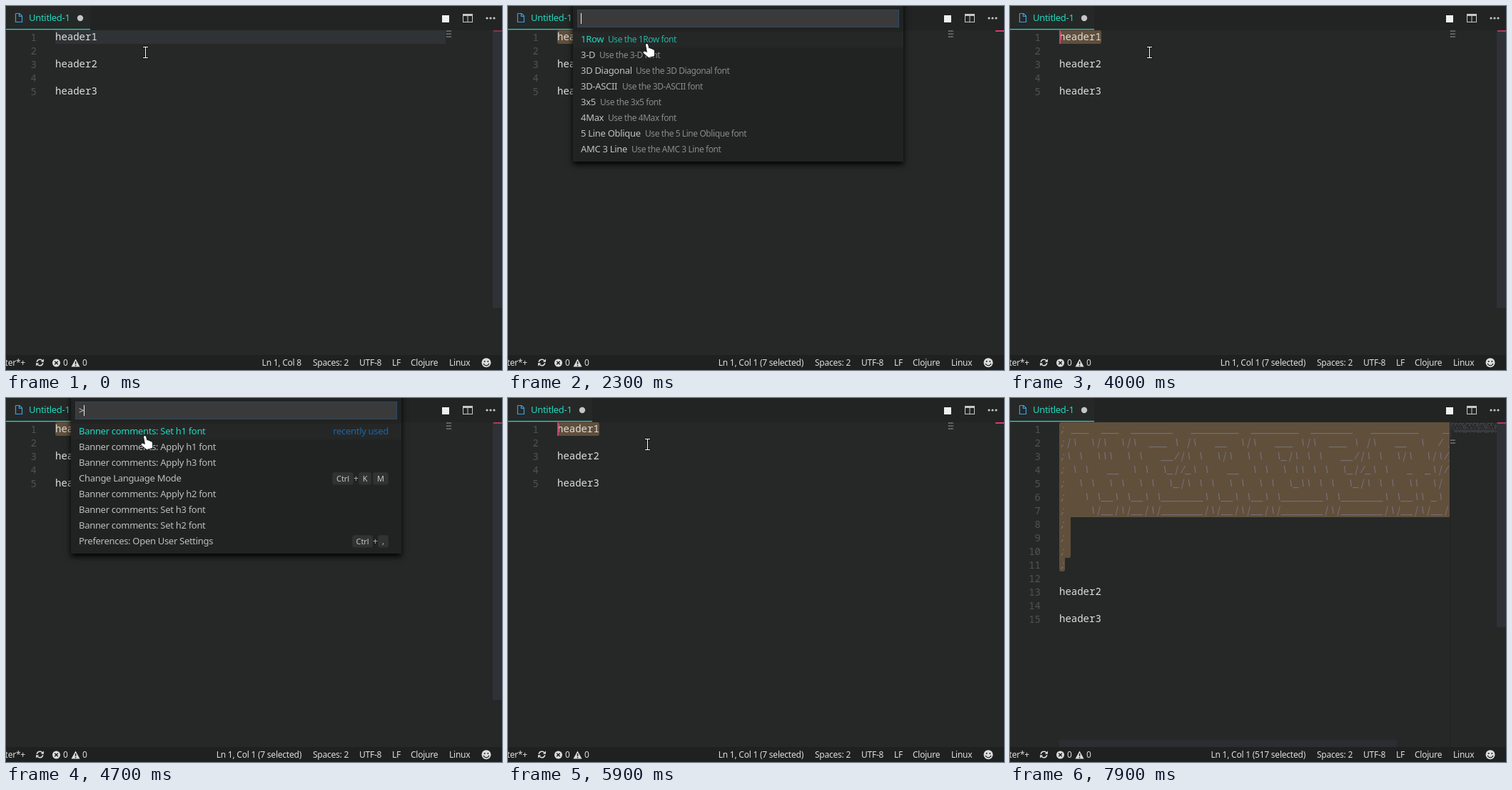
An HTML page with a canvas for the animation above (8000 ms loop, 695 by 510 pixels).

```html
<!DOCTYPE html>
<html lang="en">
<head>
<meta charset="utf-8">
<title>Banner comments</title>
<style>
html, body { margin: 0; width: 100%; height: 100%; overflow: hidden; background: #262827; }
canvas { display: block; }
</style>
</head>
<body>
<canvas id="stage" width="695" height="510"></canvas>
<script>
const ctx = document.getElementById('stage').getContext('2d');
const LOOP = 8000;
const UI = '"Noto Sans", "Open Sans", sans-serif';
const MONO = '"Noto Sans Mono", "DejaVu Sans Mono", monospace';
const LEFT = 69, TOP = 34, LINE = 19, CHAR = 8.4;
const TEAL = '#20d8bd', PINK = '#d83a6b', BROWN = '#604f3b';

// Moments of the story, in ms
const SELECT = 500, OPEN1 = 1000, NEXT1 = 1600, FONTS = 2000, CLOSE1 = 3900;
const OPEN2 = 4600, NEXT2 = 5000, CLOSE2 = 5600, BANNER = 6100, HIDE_MOUSE = 6900;

const art = String.raw` ___  ___  _______   ________  ________  _______   ________    _____
|\  \|\  \|\  ___ \ |\   __  \|\   ___ \|\  ___ \ |\   __  \  / __  \
\ \  \\\  \ \   __/|\ \  \|\  \ \  \_|\ \ \   __/|\ \  \|\  \|\/_|\  \
 \ \   __  \ \  \_|/_\ \   __  \ \  \ \\ \ \  \_|/_\ \   _  _\|/ \ \  \
  \ \  \ \  \ \  \_|\ \ \  \ \  \ \  \_\\ \ \  \_|\ \ \  \\  \|   \ \  \
   \ \__\ \__\ \_______\ \__\ \__\ \_______\ \_______\ \__\\ _\    \ \__\
    \|__|\|__|\|_______|\|__|\|__|\|_______|\|_______|\|__|\|__|    \|__|`;
const plainLines = ['header1', '', 'header2', '', 'header3'];
const bannerLines = [...art.split('\n'), '', '', '', '']
  .map(s => ';' + s).concat('', 'header2', '', 'header3');

const cmd = s => 'Banner comments: ' + s + ' font';
const restCommands = [cmd('Apply h3'), 'Change Language Mode', cmd('Apply h2'),
  cmd('Set h3'), cmd('Set h2'), 'Preferences: Open User Settings'];
// Font name and left edge of its description
const fonts = [['1Row', 140], ['3-D', 128], ['3D Diagonal', 179], ['3D-ASCII', 160],
  ['3x5', 129], ['4Max', 140], ['5 Line Oblique', 192], ['AMC 3 Line', 173]];

const clamp = v => Math.max(0, Math.min(1, v));
const blink = (t, from) => (t - from) % 1000 < 500;

function rect(x, y, w, h, color) {
  ctx.fillStyle = color;
  ctx.fillRect(x, y, w, h);
}

function round(x, y, w, h, r, color) {
  ctx.fillStyle = color;
  ctx.beginPath();
  ctx.roundRect(x, y, w, h, r);
  ctx.fill();
}

function disc(x, y, r, color) {
  ctx.fillStyle = color;
  ctx.beginPath();
  ctx.arc(x, y, r, 0, 7);
  ctx.fill();
}

function shape(points, fill, stroke, width = 1) {
  ctx.beginPath();
  for (let i = 0; i < points.length; i += 2) ctx.lineTo(points[i], points[i + 1]);
  if (fill) {
    ctx.closePath();
    ctx.fillStyle = fill;
    ctx.fill();
  }
  if (stroke) {
    ctx.strokeStyle = stroke;
    ctx.lineWidth = width;
    ctx.stroke();
  }
}

function text(s, x, y, color, font, spacing = 0, align = 'left') {
  ctx.font = font;
  ctx.letterSpacing = spacing + 'px';
  ctx.textAlign = align;
  ctx.fillStyle = color;
  ctx.fillText(s, x, y);
}

const label = (s, x, y, color, align) => text(s, x, y, color, '13px ' + UI, -0.3, align);
const small = (s, x, y, color, align) => text(s, x, y, color, '12px ' + UI, -0.23, align);
const code = (s, x, y, color, style = '', align) => text(s, x, y, color, style + '14px ' + MONO, 0, align);

function drawTabs() {
  rect(0, 0, 695, 34, '#222424');
  rect(0, 0, 118, 34, '#262827');
  rect(0, 32, 118, 1.3, TEAL);
  shape([13.5, 10.5, 19, 10.5, 22.5, 14, 22.5, 22.5, 13.5, 22.5, 13.5, 10.5], null, '#3f9edb', 1.2);
  shape([18.5, 10.5, 18.5, 14.5, 22.5, 14.5], null, '#3f9edb', 1.2);
  label('Untitled-1', 32, 21, TEAL);
  disc(104, 17, 4.2, '#c4c5c4');
  rect(611, 13, 10, 10, '#f0f0f0');
  ctx.strokeStyle = '#c8c9c8';
  ctx.lineWidth = 1;
  ctx.strokeRect(640.5, 11.5, 13, 11);
  rect(640, 11, 14, 3, '#c8c9c8');
  rect(646.5, 13, 1, 10, '#c8c9c8');
  for (const x of [674, 679, 684]) disc(x, 17, 1.6, '#c8c9c8');
}

function drawStatus(t) {
  const white = '#dcdddc';
  rect(0, 489, 695, 21, '#1f2121');
  small('master*+', 27, 504, white, 'right');
  ctx.strokeStyle = white;
  ctx.lineWidth = 1.6;
  for (const a of [0, Math.PI]) {
    ctx.save();
    ctx.translate(47.5, 499.5);
    ctx.rotate(a);
    ctx.beginPath();
    ctx.arc(0, 0, 4.3, Math.PI * 1.05, Math.PI * 1.8);
    ctx.stroke();
    shape([5.5, -5, 5.5, -0.7, 1.3, -0.7], white);
    ctx.restore();
  }
  disc(70.5, 500, 5.5, white);
  shape([68.2, 497.7, 72.8, 502.3], null, '#1f2121', 1.5);
  shape([72.8, 497.7, 68.2, 502.3], null, '#1f2121', 1.5);
  small('0', 80, 504, white);
  shape([97.5, 494.5, 103.5, 505.5, 91.5, 505.5], white);
  rect(96.8, 498, 1.5, 4, '#1f2121');
  rect(96.8, 503, 1.5, 1.5, '#1f2121');
  small('0', 107, 504, white);

  const place = t < SELECT ? 'Ln 1, Col 8'
    : `Ln 1, Col 1 (${t < BANNER ? 7 : 517} selected)`;
  small(place, 414, 504, white, 'right');
  small('Spaces: 2', 430, 504, white);
  small('UTF-8', 495, 504, white);
  small('LF', 541, 504, white);
  small('Clojure', 567, 504, white);
  small('Linux', 621, 504, white);
  disc(673, 499.7, 6.5, white);
  disc(670.7, 498, 1, '#1f2121');
  disc(675.3, 498, 1, '#1f2121');
  ctx.beginPath();
  ctx.arc(673, 500, 3.8, 0.2, Math.PI - 0.2);
  ctx.strokeStyle = '#1f2121';
  ctx.lineWidth = 1.3;
  ctx.stroke();
}

function sliderAlpha(t) {
  if (t < CLOSE1) return 1 - clamp((t - 1800) / 500);
  if (t < BANNER) return clamp((t - CLOSE1) / 100) * (1 - clamp((t - 5000) / 800));
  return 1;
}

function drawSelection(t) {
  if (t < SELECT) {
    rect(LEFT, TOP, 547, LINE, '#2f3336');
  } else if (t < BANNER) {
    round(LEFT, TOP, 59, LINE, 3, BROWN);
  } else {
    round(LEFT, TOP, 548, 7 * LINE, [3, 0, 3, 0], BROWN);
    round(LEFT, TOP + 7 * LINE, 16, 3 * LINE, [0, 0, 3, 0], BROWN);
    round(LEFT, TOP + 10 * LINE, 8, LINE, [0, 0, 3, 3], BROWN);
  }
}

function drawMinimap(lines) {
  lines.forEach((line, row) => {
    const comment = line[0] === ';';
    for (let i = 0; i < Math.min(line.length, 66); i++) {
      if (line[i] === ' ') continue;
      const low = line[i] === '_' ? 1 : 0;
      const strong = i % 3 !== 2;
      const color = comment ? '#46444b' : strong ? '#969796' : '#626463';
      rect(617 + i, TOP + row * 2 + (comment ? low : 0.5), 1, comment ? 1.3 : 1.2, color);
    }
  });
}

function drawEditor(t, paletteOpen) {
  const done = t >= BANNER;
  const lines = done ? bannerLines : plainLines;
  drawSelection(t);
  ctx.save();
  ctx.beginPath();
  ctx.rect(0, TOP, 616, 455);
  ctx.clip();
  lines.forEach((line, i) => {
    const y = TOP + i * LINE + 14;
    code(i + 1, 43, y + 1, '#505353', '', 'right');
    if (line[0] === ';') code(line.slice(0, 66), LEFT, y, '#77717a', 'italic ');
    else code(line, LEFT, y, '#dededb');
  });
  ctx.restore();
  if (done) rect(616, TOP, 1, 455, '#202222');
  drawMinimap(lines);

  const alpha = sliderAlpha(t);
  rect(683, TOP, 12, 2, PINK);
  ctx.globalAlpha = alpha;
  rect(682, TOP, 13, done ? 287 : 389, '#2f3137');
  if (done) rect(LEFT, 479, 473, 10, '#2b2d32');
  ctx.globalAlpha = 1 - alpha * (t < SELECT ? 0.5 : 0.2);
  rect(683, TOP, 12, 2, PINK);
  ctx.globalAlpha = 1;

  const start = done ? BANNER : t >= CLOSE2 ? CLOSE2 : t >= CLOSE1 ? CLOSE1 : SELECT;
  if (t >= SELECT && !paletteOpen && blink(t, start)) rect(LEFT, TOP, 2, LINE, PINK);
}

function key(s, x, y, w) {
  round(x, y - 9, w, 18, 3, '#2a2c2c');
  round(x + 0.5, y - 8.5, w - 1, 16, 3, '#313333');
  text(s, x + w / 2, y + 4, '#c3c4c3', '11px ' + UI, -0.1, 'center');
}

function drawCommands(t) {
  const second = t >= OPEN2;
  const active = t >= (second ? NEXT2 : NEXT1) ? 1 : 0;
  const top = [cmd('Apply h1'), cmd('Set h1')];
  if (second) top.reverse();
  rect(91, 36 + active * 22, 463, 22, '#252727');
  [...top, ...restCommands].forEach((s, i) =>
    label(s, 102, 51 + i * 22, i === active ? TEAL : '#bcbdbc'));
  label('recently used', 536, 51, '#1a66a6', 'right');
  key('Ctrl', 457, 113, 30);
  small('+', 487, 117, '#b0b1b0');
  key('K', 494, 113, 18);
  key('M', 514, 113, 22);
  key('Ctrl', 485, 201, 29);
  small('+', 514, 205, '#b0b1b0');
  key(',', 521, 201, 15);
}

function drawFonts(t) {
  const active = [3000, 3300, 3500].filter(m => t >= m).length;
  rect(91, 36 + active * 22, 463, 22, '#252727');
  fonts.forEach(([name, x], i) => {
    const y = 51 + i * 22, on = i === active;
    label(name, 102, y, on ? TEAL : '#c0c1c0');
    text('Use the ' + name + ' font', x, y, on ? '#22b49f' : '#898b8a', '12px ' + UI, -0.42);
  });
  if (active) rect(544, 36, 10, 20, '#303338');
}

function drawPalette(t) {
  const choosing = t >= FONTS && t < CLOSE1;
  ctx.save();
  ctx.shadowColor = '#000';
  ctx.shadowBlur = 8;
  ctx.shadowOffsetY = 4;
  rect(91, -12, 463, 230, '#212323');
  ctx.restore();
  rect(97, 5, 451, 25, '#274a6b');
  rect(98, 6, 449, 23, '#3a3a3a');
  if (!choosing) label('>', 102, 22, '#d0d0d0');
  const since = t >= OPEN2 ? OPEN2 : choosing ? FONTS : OPEN1;
  if (blink(t, since)) rect(choosing ? 102 : 109, 10, 1, 15, '#f0f0f0');
  if (choosing) drawFonts(t);
  else drawCommands(t);
}

function drawHand() {
  ctx.save();
  ctx.translate(188, 52);
  ctx.lineJoin = 'round';
  ctx.beginPath();
  ctx.moveTo(5, 2);
  ctx.quadraticCurveTo(6.5, 0, 8, 2);
  ctx.lineTo(9.5, 7.5);
  ctx.quadraticCurveTo(11, 6.5, 12, 8);
  ctx.quadraticCurveTo(13.5, 7.5, 14.5, 9);
  ctx.quadraticCurveTo(16.5, 8.7, 17, 11);
  ctx.lineTo(17, 18);
  ctx.lineTo(9, 20);
  ctx.lineTo(2.5, 14.5);
  ctx.quadraticCurveTo(0.5, 12, 3, 11.5);
  ctx.lineTo(7, 13);
  ctx.closePath();
  ctx.strokeStyle = '#1a1a1a';
  ctx.lineWidth = 1.6;
  ctx.stroke();
  ctx.fillStyle = '#fff';
  ctx.fill();
  ctx.restore();
}

function drawBeam() {
  rect(191, 56, 9, 3, '#161818');
  rect(191, 71, 9, 3, '#161818');
  rect(194, 57, 3, 16, '#161818');
  rect(192, 57, 7, 1, '#fff');
  rect(195, 57, 1, 16, '#fff');
  rect(192, 72, 7, 1, '#fff');
}

function draw(t) {
  const paletteOpen = (t >= OPEN1 && t < CLOSE1) || (t >= OPEN2 && t < CLOSE2);
  rect(0, 0, 695, 510, '#262827');
  drawTabs();
  drawEditor(t, paletteOpen);
  drawStatus(t);
  if (paletteOpen) {
    drawPalette(t);
    drawHand();
  } else if (t < HIDE_MOUSE) {
    drawBeam();
  }
}

const begin = performance.now();
function tick() {
  const t = (performance.now() - begin) % LOOP;
  draw(Math.floor(t / 100) * 100);
  requestAnimationFrame(tick);
}
tick();
</script>
</body>
</html>
```
